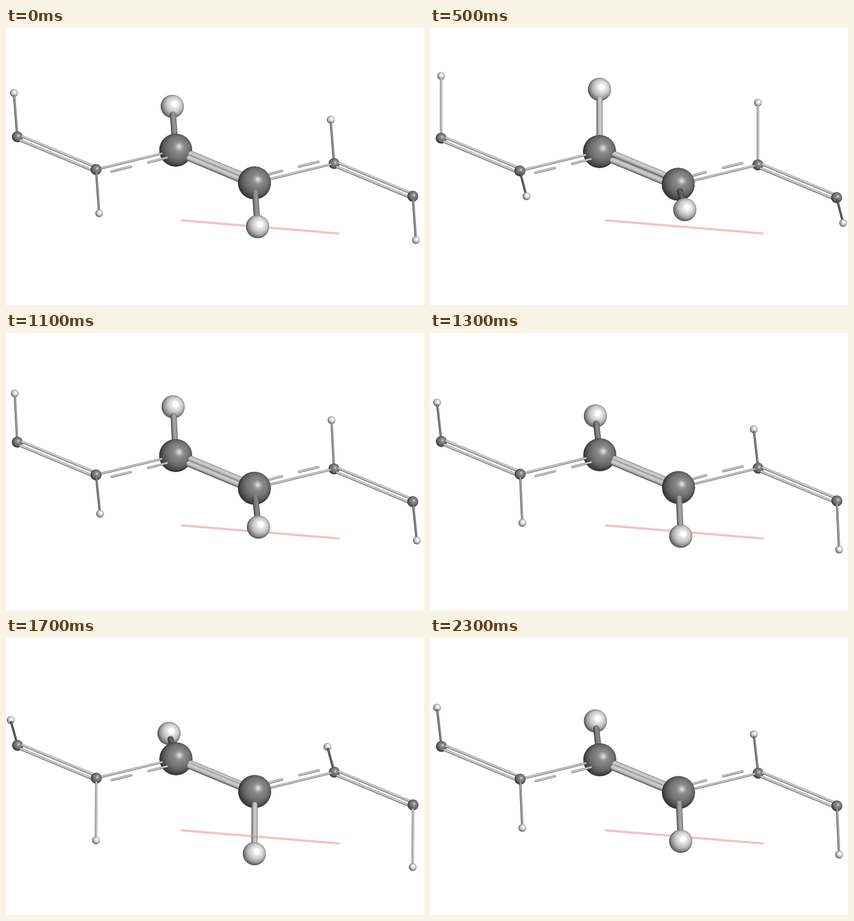
Recreate the animation shown at these times as an HTML page with a canvas. Size 905x601 px, loop 2400 ms.

```html
<!DOCTYPE html>
<html lang="en">
<head>
<meta charset="utf-8">
<title>Chain vibration</title>
<style>
  html, body { margin: 0; width: 100%; height: 100%; overflow: hidden; background: #fff; }
  canvas { display: block; }
</style>
</head>
<body>
<canvas id="stage" width="905" height="601"></canvas>
<script>
const ctx = document.getElementById('stage').getContext('2d');
const LOOP = 2400, STEP = 100;
const CELL = [342.9, 29];

// Headlight plus one lamp from the upper right; half is the highlight direction.
const LIGHT = [0.4, -0.4, 0.82], HALF = [0.21, -0.21, 0.955];
const dot = (a, b) => a[0] * b[0] + a[1] * b[1] + a[2] * b[2];
const shade = n => 0.3 + 0.35 * n[2] + 0.4 * Math.max(0, dot(n, LIGHT));

const gray = v => `rgb(${v},${v},${v})`;
const tone = base => f => gray(Math.round(Math.min(255, base * f)));
const pink = f => {
  const k = 0.6 + 0.4 * f;
  return `rgba(${Math.round(Math.min(255, 255 * k))},${Math.round(130 * k)},${Math.round(130 * k)},.5)`;
};

// Sphere rendered once at double size.
function makeBall(r, base) {
  const size = Math.ceil(r * 4) + 4, mid = size / 2, R = r * 2;
  const canvas = document.createElement('canvas');
  canvas.width = canvas.height = size;
  const c = canvas.getContext('2d'), img = c.createImageData(size, size);
  for (let j = 0; j < size; j++) {
    for (let i = 0; i < size; i++) {
      const x = i + 0.5 - mid, y = j + 0.5 - mid, d = Math.hypot(x, y);
      const k = Math.max(R, d);
      const n = [x / k, y / k, Math.sqrt(Math.max(0, 1 - d * d / (k * k)))];
      const shine = 80 * Math.max(0, dot(n, HALF)) ** 50;
      const v = base * shade(n) + shine, p = (j * size + i) * 4;
      img.data[p] = img.data[p + 1] = img.data[p + 2] = v;
      img.data[p + 3] = 255 * Math.min(1, Math.max(0, R - d + 0.5));
    }
  }
  c.putImageData(img, 0, 0);
  return ([x, y]) => ctx.drawImage(canvas, x - mid / 2, y - mid / 2, size / 2, size / 2);
}

function makeKit(rc, rh, w) {
  return { rc, rh, w, carbon: makeBall(rc, 138), hydrogen: makeBall(rh, 236) };
}
const BIG = makeKit(35.7, 25.1, 13.2), SMALL = makeKit(11.8, 8.4, 4.9);

// Point at distance d from a towards b, moved sideways by off.
function along(a, b, d, off = 0) {
  const dx = b[0] - a[0], dy = b[1] - a[1], len = Math.hypot(dx, dy);
  return [a[0] + (dx * d - dy * off) / len, a[1] + (dy * d + dx * off) / len];
}

// Cylinder shaded across its width.
function rod(a, b, w, color) {
  const p = along(a, b, 0, -w / 2), q = along(a, b, 0, w / 2);
  const side = [(q[0] - p[0]) / w, (q[1] - p[1]) / w];
  const g = ctx.createLinearGradient(...p, ...q);
  for (let i = 0; i <= 12; i++) {
    const u = i / 6 - 1;
    g.addColorStop(i / 12, color(shade([side[0] * u, side[1] * u, Math.sqrt(1 - u * u)])));
  }
  ctx.strokeStyle = g;
  ctx.lineWidth = w;
  ctx.lineCap = 'round';
  ctx.beginPath();
  ctx.moveTo(...a);
  ctx.lineTo(...b);
  ctx.stroke();
}

const bond = (a, b, w) => rod(a, b, w, tone(202));

// Bond leaving the front of one atom; it dims as it foreshortens.
function stem(from, r, to, w) {
  const p = Math.hypot(to[0] - from[0], to[1] - from[1]);
  const start = along(from, to, r * (p - 12) / 190 + w / 2);
  rod(start, to, w, tone(98 + (p - 57) * 1.35));
}

function axisLine(from, to) {
  const y = x => 417 + (x - 379) * 29 / 343;
  rod([from, y(from)], [to, y(to)], 4.6, pink);
}

function makeUnit(k, s) {
  const at = (x, y) => [x + k * CELL[0], y + k * CELL[1]];
  return {
    big: k === 0,
    ...(k === 0 ? BIG : SMALL),
    c1: at(367.5 - 0.5 * s, 265 + 3.1 * s),
    c2: at(537.9 - 0.5 * s, 336 + 3.1 * s),
    h1: at(360 + 7.3 * s, 170 - 38.3 * s),
    h2: at(544.7 + 7.2 * s, 431 - 38.3 * s)
  };
}

function draw(s) {
  ctx.fillStyle = '#fff';
  ctx.fillRect(0, 0, 905, 601);
  const units = [-1, 0, 1].map(k => makeUnit(k, s));

  for (const u of units) {
    u.hydrogen(u.h1);
    // full length of a small bond is the same, only its width differs
    stem(u.h1, u.rh, u.c1, u.w);
    u.carbon(u.c1);
  }

  // single bonds and their dashed partners
  for (let i = 0; i < 2; i++) {
    const end = units[i + 1];
    bond(along(end.c1, units[i].c2, end.big ? 32 : 9), units[i].c2, 5);
  }
  const dashes = [[228, 311.2, 271, 300.5], [307.5, 291.6, 348, 281.5],
                  [560, 320, 598, 309.5], [634, 300.5, 677, 290]];
  for (const [x1, y1, x2, y2] of dashes) {
    const dx = -0.5 * s, dy = 3.1 * s;
    bond([x1 + dx, y1 + dy], [x2 + dx, y2 + dy], 5);
  }

  for (const u of units) {
    const gap = u.big ? 5 + 2.1 * s : 4.7;
    const len = Math.hypot(u.c2[0] - u.c1[0], u.c2[1] - u.c1[1]);
    for (const off of [-gap, gap]) {
      bond(along(u.c1, u.c2, u.big ? 35 : 10, off), along(u.c1, u.c2, len, off), u.big ? 13.6 : 5.6);
    }
  }

  for (const u of units) {
    u.carbon(u.c2);
    stem(u.c2, u.rc, u.h2, u.w);
  }

  const inFront = s < -0.3;
  if (!inFront) axisLine(381, 720);
  for (const u of units) u.hydrogen(u.h2);
  if (inFront) axisLine(381, 720);
}

function frame(now) {
  const step = Math.floor((now % LOOP) / STEP);
  draw(Math.sin(step * STEP / LOOP * Math.PI * 2));
  requestAnimationFrame(frame);
}
frame(0);
</script>
</body>
</html>
```
